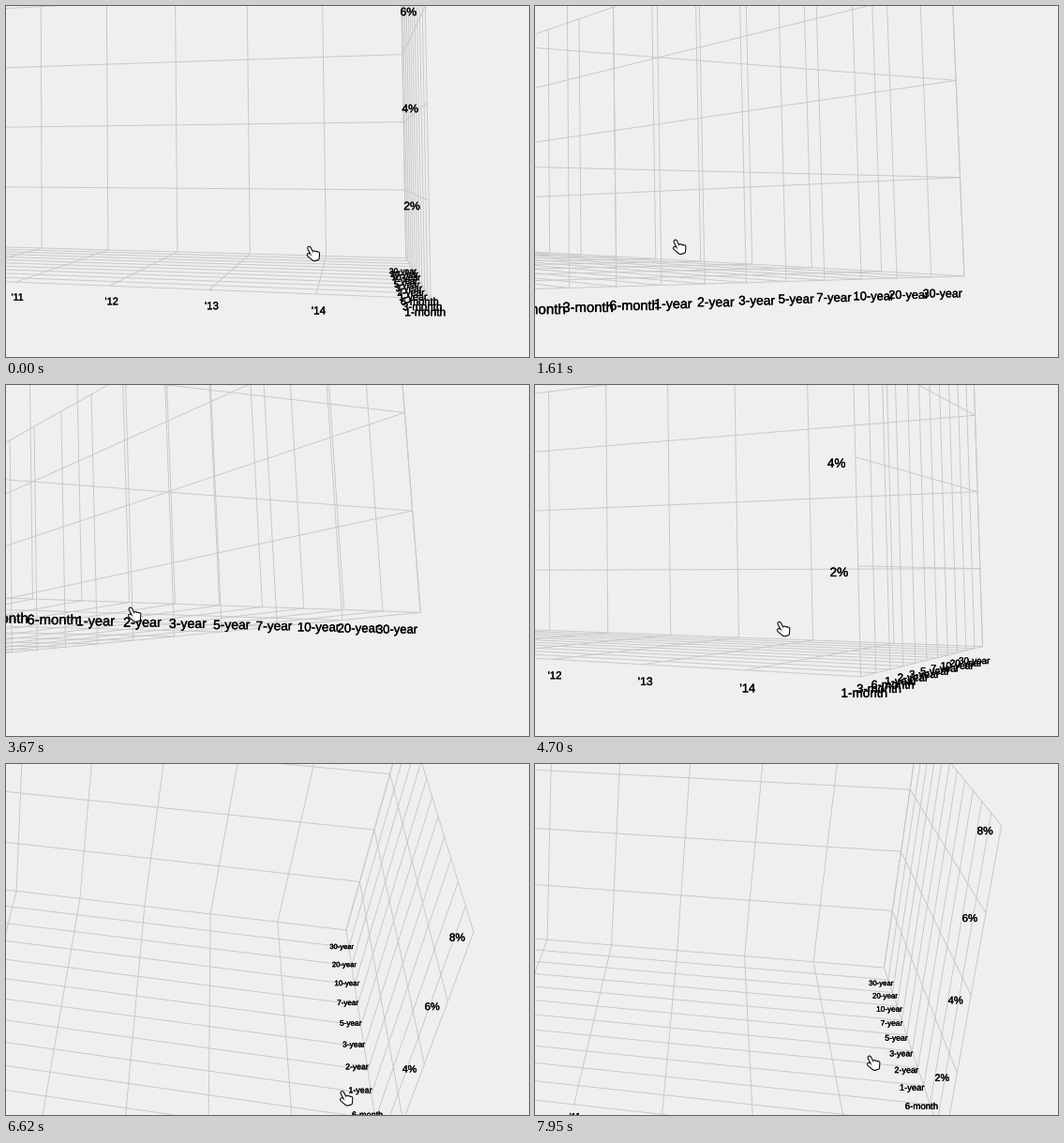
A matplotlib script for the animation above (8000 ms loop, 558 by 374 pixels).

```python
import numpy as np
import matplotlib.pyplot as plt
from matplotlib.animation import FuncAnimation
from matplotlib.collections import LineCollection
from matplotlib.patheffects import withStroke

W, H, DPI = 558, 374, 100
PX = 72 / DPI
FRAMES, INTERVAL, STEP = 160, 50, 147.2
plt.rcParams["font.family"] = "Liberation Sans"
plt.rcParams["text.hinting"] = "none"

# The camera orbits the centre of the box at distance 1
FOCAL, CENTER = 1130, np.array([-52, 122.8])
YEARS, TOP, ROWS = 11, 8, 11
YEAR, PERCENT, ROW = 0.072, 0.0325, 0.0298
FONT_PX = 8.6

# Orbit turning points: step, yaw, pitch; equal neighbours are pauses
ORBIT = np.array([
    (0, 20.3, -2.4), (7, 50.4, -5.1), (16, 83.5, -5.8),
    (20, 85.5, -6), (22, 85.5, -6), (25, 69.5, -10.5),
    (28, 47, -9.5), (29, 47, -9.5), (38, 15.5, 6.9),
    (45, 11.2, 36.4), (48, 11.4, 30), (50, 11.4, 30), (54, 11.7, 20.6)])


def pointer_at(yaw, pitch):
    """The pointer drags the view: a fixed angle per pixel."""
    return np.array([328 - (yaw - 20.3) / 0.258, 264 + (pitch + 2.4) / 0.42])


def project(points, yaw, pitch):
    """Map (year offset, percent, row) to pixels and relative depth."""
    p = np.asarray(points, float)
    x = YEAR * (p[..., 0] + YEARS / 2)
    y = PERCENT * (p[..., 1] - TOP / 2)
    z = ROW * (ROWS / 2 - p[..., 2])
    sy, cy = np.sin(yaw), np.cos(yaw)
    sp, cp = np.sin(pitch), np.cos(pitch)
    across, toward = x * cy - z * sy, x * sy + z * cy
    depth = 1 - toward * cp - y * sp
    up = y * cp - toward * sp
    screen = np.stack([across, -up], -1) * FOCAL / depth[..., None]
    return CENTER + screen, depth


def build_grid():
    lines = []
    for x in range(-YEARS, 1):
        lines.append([(x, 0, 0), (x, 0, ROWS)])
        lines.append([(x, 0, ROWS), (x, TOP, ROWS)])
    for z in range(ROWS + 1):
        lines.append([(-YEARS, 0, z), (0, 0, z)])
        lines.append([(0, 0, z), (0, TOP, z)])
    for y in range(2, TOP + 1, 2):
        lines.append([(-YEARS, y, ROWS), (0, y, ROWS)])
        lines.append([(0, y, 0), (0, y, ROWS)])
    return np.array(lines, float)


def build_labels():
    """Text, anchor in the box, and screen offset of its left baseline."""
    below = -0.33
    terms = [f"{n}-month" for n in (1, 3, 6)]
    terms += [f"{n}-year" for n in (1, 2, 3, 5, 7, 10, 20, 30)]
    labels = [(s, (0, below, i + 0.5), (-19, 3)) for i, s in enumerate(terms)]
    labels += [(f"{y}%", (0, y, 0), (-19, 7)) for y in range(2, TOP + 1, 2)]
    labels += [(f"'{15 - k:02d}", (-k, below, 0), (-4, 3.5))
               for k in range(1, YEARS + 1)]
    return labels


def build_hand():
    """Round strokes around the pointer: index finger, thumb, knuckles."""
    strokes = [[(-4.5, -6), (0, 3)], [(-5, 1.2), (0, 5.5)]]
    strokes += [[(0.6 + 2.1 * k, -1.4 + 0.5 * k), (1.2 + 1.6 * k, 6 - 0.5 * k)]
                for k in range(3)]
    return np.array(strokes)


GRID, HAND = build_grid(), build_hand()
LABELS = build_labels()
ANCHORS = np.array([a for _, a, _ in LABELS], float)
OFFSETS = np.array([o for _, _, o in LABELS], float)

fig = plt.figure(figsize=(W / DPI, H / DPI), dpi=DPI, facecolor="#efefef")
ax = fig.add_axes([0, 0, 1, 1])
ax.set(xlim=(0, W), ylim=(H, 0))
ax.axis("off")


def add_lines(color, width, zorder):
    lines = LineCollection([], colors=color, linewidths=width * PX,
                           capstyle="round", zorder=zorder)
    return ax.add_collection(lines)


grid = add_lines("#c8c8c8", 0.95, 1)
hand = [add_lines("black", 4.6, 3), add_lines("white", 2.5, 4)]
heavier = [withStroke(linewidth=0.3 * PX, foreground="black")]
texts = [ax.text(0, 0, s, color="black", ha="left", va="baseline",
                 clip_on=True, zorder=2, path_effects=heavier)
         for s, _, _ in LABELS]


def draw(frame):
    step = int((frame * INTERVAL + 45) / STEP)
    yaw, pitch = (np.interp(step, ORBIT[:, 0], ORBIT[:, i]) for i in (1, 2))
    view = np.radians(yaw), np.radians(pitch)
    grid.set_segments(project(GRID, *view)[0])

    spots, depth = project(ANCHORS, *view)
    spots = spots + OFFSETS / depth[:, None]
    for text, (x, y), d in zip(texts, spots, depth):
        text.set_visible(-80 < x < W and -20 < y < H + 20)
        text.set_position((x, y))
        text.set_fontsize(FONT_PX / d * PX)

    for layer in hand:
        layer.set_segments(HAND + pointer_at(yaw, pitch))
    return [grid, *texts, *hand]


anim = FuncAnimation(fig, draw, frames=FRAMES, interval=INTERVAL, repeat=True,
                     repeat_delay=0, blit=False)
plt.show()
```
